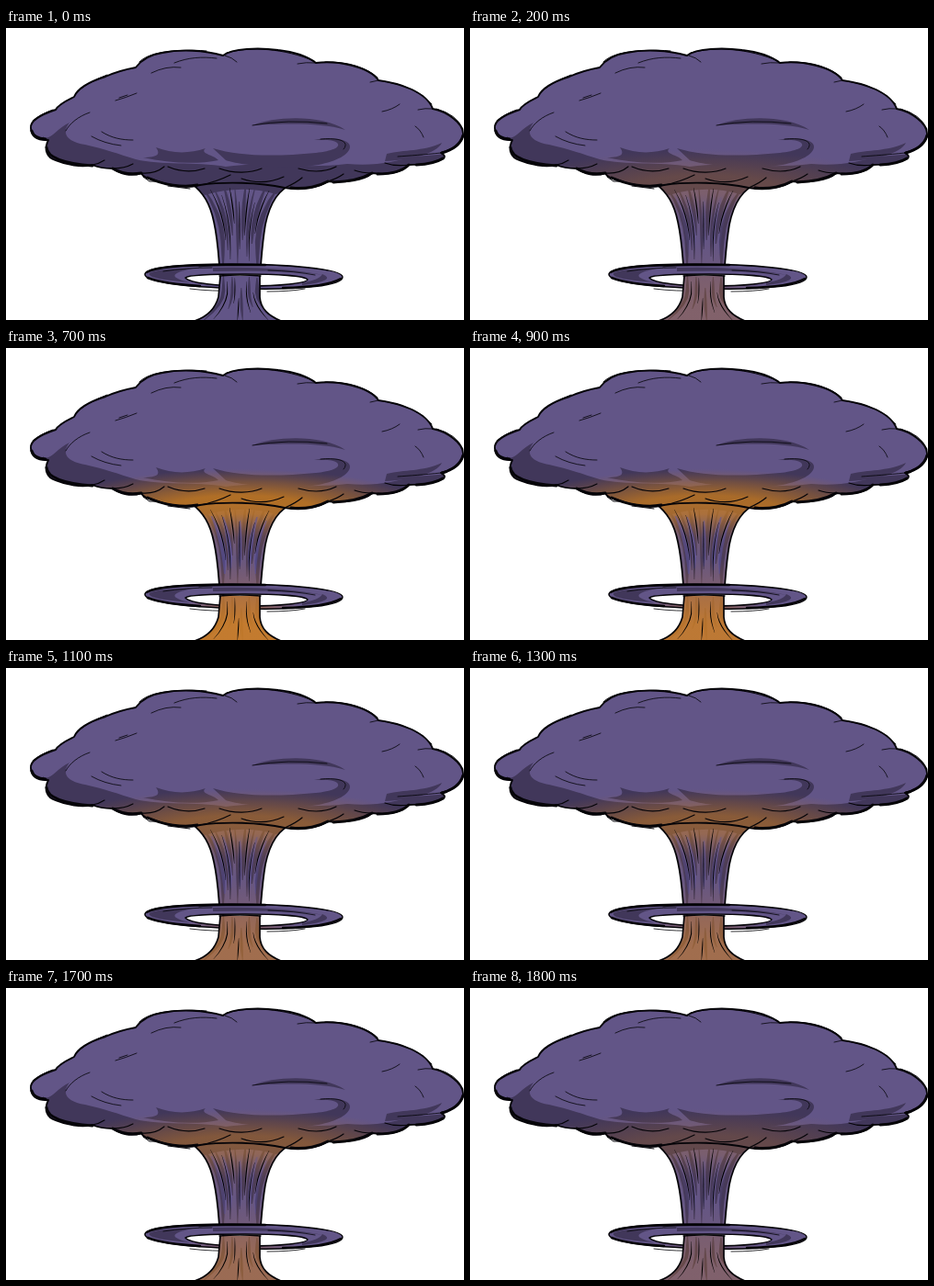
Write an HTML page that moves like this. It is 498 px wide and 318 px high and loops after 1900 ms.

```html
<!DOCTYPE html>
<html lang="en">
<head>
<meta charset="utf-8">
<title>Mushroom cloud</title>
<style>
html, body { margin: 0; width: 100%; height: 100%; overflow: hidden; background: #fff; }
svg { display: block; width: 498px; height: 318px; }
.body { fill: #625587; }
.shade { fill: #41375a; }
.ink { fill: none; stroke: #050408; stroke-linecap: round; stroke-linejoin: round; }
</style>
</head>
<body>
<svg viewBox="0 0 498 318">
  <defs>
    <path id="cap" d="M27 109C26 101 36 95 54 89C57 83 66 79 74 75C78 65 92 58 108 53C119 48 130 45 141 43C147 35 156 29 170 27C190 23 215 24 236 30C246 22 275 21 296 24C314 26 328 31 337 38C360 35 395 42 405 57C427 60 457 69 464 88C480 91 497 104 497 115C497 125 487 132 473 136C480 140 477 143 468 145C459 149 447 149 438 149C432 157 416 160 398 158C390 166 366 169 350 167C340 174 322 177 303 174C275 168 238 167 211 171C196 175 174 171 160 165C153 164 149 162 147 158C136 162 124 159 116 153C108 153 100 152 94 149C82 152 66 149 54 144C44 141 41 132 46 122C34 123 27 118 27 109Z"/>
    <path id="stem" d="M201 169Q256 158 312 170C294 176 286 195 282 214C279 232 278 247 277 264H232C231 246 230 229 226 211C222 192 215 179 201 169Z"/>
    <path id="base" d="M233 270H276V293C277 306 285 313 299 319H205C220 314 228 304 231 293Z"/>
    <path id="ring" fill-rule="evenodd" d="M151 268C153 260 195 257 245 257C305 257 365 262 366 271C366 281 319 285 266 284C204 283 150 277 151 268ZM195 272C200 278 230 281 263 281C298 281 326 278 328 274C325 270 295 268 260 268C225 268 198 269 195 272Z"/>
    <clipPath id="capClip"><use href="#cap"/></clipPath>
    <clipPath id="stemClip"><use href="#stem"/></clipPath>
    <clipPath id="baseClip"><use href="#base"/></clipPath>
    <radialGradient id="heat" gradientUnits="userSpaceOnUse" cx="0" cy="0" r="1" gradientTransform="translate(255 181) scale(215 49)">
      <stop offset="0" stop-color="#bf761f"/>
      <stop offset=".42" stop-color="#bf761f"/>
      <stop offset=".72" stop-color="#b8721f" stop-opacity=".5"/>
      <stop offset="1" stop-color="#a86828" stop-opacity="0"/>
    </radialGradient>
    <linearGradient id="stemHeat" gradientUnits="userSpaceOnUse" x1="0" y1="165" x2="0" y2="264">
      <stop offset="0" stop-color="#c47a22"/>
      <stop offset=".16" stop-color="#c47a22" stop-opacity=".9"/>
      <stop offset=".42" stop-color="#a0683c" stop-opacity=".3"/>
      <stop offset=".65" stop-color="#a0683c" stop-opacity=".12"/>
      <stop offset="1" stop-color="#b07048" stop-opacity=".45"/>
    </linearGradient>
    <linearGradient id="baseHeat" gradientUnits="userSpaceOnUse" x1="0" y1="268" x2="0" y2="300">
      <stop offset="0" stop-color="#c67a2a" stop-opacity=".85"/>
      <stop offset="1" stop-color="#d08023"/>
    </linearGradient>
    <radialGradient id="ringHeat" gradientUnits="userSpaceOnUse" cx="0" cy="0" r="1" gradientTransform="translate(255 286) scale(70 17)">
      <stop offset="0" stop-color="#c87a28" stop-opacity=".8"/>
      <stop offset="1" stop-color="#c87a28" stop-opacity="0"/>
    </radialGradient>
  </defs>

  <g clip-path="url(#stemClip)">
    <use href="#stem" class="body"/>
    <path class="shade" d="M200 166H313L294 181Q256 170 216 182Z"/>
    <g id="stemShade" class="shade"></g>
    <rect class="glow" x="195" y="160" width="120" height="106" fill="url(#stemHeat)"/>
    <g id="cool" class="glow" fill="#5751a4"></g>
    <g id="stemInk"></g>
  </g>
  <path class="ink" stroke-width="1.8" d="M201 169C215 179 222 192 226 211C230 229 231 246 232 259M312 170C294 176 286 195 282 214C279 232 278 247 277 259"/>

  <use href="#cap" class="body"/>
  <g clip-path="url(#capClip)">
    <g class="shade">
      <path d="M40 118C48 124 53 111 69 103C59 116 68 124 86 127C109 132 121 137 141 143C169 150 205 145 239 151C281 145 324 154 371 148C402 151 424 145 444 140L482 137V180H160L40 150Z"/>
      <path d="M163 130C181 137 199 137 217 131C210 137 226 138 231 144C207 149 176 147 149 141C166 141 168 137 163 130Z"/>
      <path d="M225 131C254 140 294 140 337 136C354 134 365 130 360 125C356 121 344 122 335 122C353 118 374 121 374 129C374 138 359 145 340 149C301 155 253 149 239 144Z"/>
      <path d="M268 106C292 96 344 94 369 111C342 103 307 104 268 106Z"/>
      <path d="M414 137C434 132 452 135 474 125C468 137 440 144 412 145Z"/>
    </g>
    <rect class="glow" x="30" y="120" width="450" height="62" fill="url(#heat)"/>
    <path class="ink" stroke-width=".8" d="M91 92C79 96 69 104 65 112M104 113C115 120 126 122 138 122M93 118Q107 126 125 128M119 79Q130 76 142 71M123 76L132 73M183 38C198 32 213 31 229 33M158 49Q174 41 190 43M238 30Q246 32 251 37M337 38Q326 37 317 39M405 57L396 59M409 91Q420 89 428 83M464 88Q456 87 448 89M445 107Q451 111 454 119M473 136C454 138 439 139 426 140M268 106Q306 99 349 104M342 121C364 119 374 124 367 132"/>
    <path class="ink" stroke-width="1.2" d="M94 149Q101 148 107 144M116 153Q129 153 138 148M147 158C158 159 166 156 172 151M176 151C190 157 204 157 216 153M211 171C228 168 238 163 244 160M232 153C248 159 266 158 278 153M256 164C273 170 289 168 302 162M303 174Q315 169 322 163M318 153C335 158 349 156 359 151M350 167Q360 164 367 159M398 158Q387 158 379 155M438 149Q423 151 412 147"/>
  </g>
  <use href="#cap" class="ink" stroke-width="1.9"/>
  <path class="ink" stroke-width="3" d="M28 112Q30 120 43 121M44 130C45 143 70 148 94 150M116 153Q130 161 147 158M154 163C171 171 193 174 208 171M310 174C326 176 341 172 350 167M356 168Q382 167 398 158M404 159Q428 159 438 149M446 149Q466 148 475 142M474 136Q493 131 497 117"/>
  <path class="ink" stroke-width="1" d="M29 101Q39 93 51 89M75 73Q85 60 110 51M145 37C154 27 182 22 218 25M240 27C266 20 303 22 335 36M347 37C373 36 393 44 404 54M411 58Q448 64 463 83M468 88Q490 94 497 110M149 162L156 167L164 167M176 172L200 175"/>

  <use href="#ring" class="body"/>
  <path class="shade" d="M156 267C166 262 190 262 203 262C177 267 178 272 200 277C174 275 153 272 156 267ZM225 261Q294 259 346 269Q306 263 225 265ZM322 277Q340 275 344 268Q361 275 322 280Z"/>
  <use href="#ring" class="glow" fill="url(#ringHeat)"/>
  <use href="#ring" class="ink" stroke-width="1.5"/>
  <path class="ink" stroke-width="2.4" d="M153 266C163 260 201 258 239 258H282M154 272Q173 279 211 281M301 283Q348 282 364 273"/>
  <path class="ink" stroke-width=".8" d="M210 260C248 255 310 258 350 264M171 265Q196 261 224 261M285 264Q315 265 336 269M200 284Q224 287 250 286M284 287Q310 287 325 284"/>

  <g clip-path="url(#baseClip)">
    <use href="#base" class="body"/>
    <g id="baseShade" class="shade"></g>
    <rect class="glow" x="200" y="268" width="102" height="52" fill="url(#baseHeat)"/>
    <g id="baseInk"></g>
  </g>
  <path class="ink" stroke-width="1.7" d="M233 270L231 293C228 304 220 314 205 319M276 270V293C277 306 285 313 299 319"/>
  <path class="ink" stroke-width="1.3" d="M232 270Q254 268 277 270"/>
</svg>
<script>
const el = id => document.getElementById(id);
const glows = [...document.querySelectorAll('.glow')];

// Stem strands are placed by u, their share of the width from left to right.
const flare = y => y < 265
  ? 22 + 29 * Math.pow(Math.max(0, (240 - y) / 70), 2.1)
  : 21.5 + 25 * Math.pow(Math.max(0, (y - 287) / 31), 1.8);
const at = (u, y) => 254.5 + (u * 2 - 1) * flare(y);

function strand(u, top, end, w) {
  const left = [], right = [];
  for (let i = 0; i <= 6; i++) {
    const y = top + (end - top) * i / 6;
    const half = w * Math.sin(Math.PI * (i + 0.6) / 7.2) / 2;
    const x = at(u, y);
    left.push((x - half).toFixed(1) + ' ' + y.toFixed(1));
    right.unshift((x + half).toFixed(1) + ' ' + y.toFixed(1));
  }
  return `<path d="M${left.concat(right).join('L')}Z"/>`;
}
const strands = list => list.map(s => strand(...s)).join('');

el('stemShade').innerHTML = strands([
  [.08, 172, 262, 5], [.2, 174, 242, 4], [.32, 170, 226, 4], [.44, 174, 257, 3],
  [.56, 170, 231, 4], [.67, 173, 249, 3], [.79, 171, 235, 5], [.93, 173, 262, 6]
]);
el('cool').innerHTML = strands([
  [.12, 183, 246, 6], [.27, 184, 240, 5], [.5, 188, 238, 4], [.73, 184, 242, 5], [.88, 188, 246, 4]
]);
el('stemInk').innerHTML = strands([
  [.15, 176, 231, 1.2], [.26, 182, 252, 1], [.38, 174, 213, 1.3], [.49, 189, 241, 1],
  [.61, 175, 226, 1.3], [.72, 190, 254, 1], [.85, 177, 224, 1.3]
]);
el('baseShade').innerHTML = strands([
  [.08, 270, 318, 4], [.3, 271, 306, 3], [.53, 283, 318, 3], [.73, 271, 304, 3], [.93, 272, 318, 5]
]);
el('baseInk').innerHTML = strands([
  [.18, 276, 317, 1.2], [.37, 272, 300, 1], [.47, 294, 318, 1.1], [.66, 276, 310, 1], [.83, 288, 318, 1.2]
]);

// Heat pulse: time and strength, advancing in tenths of a second.
const loop = 1900, step = 100;
const pulse = [[0, 0], [400, .57], [700, .88], [800, .95], [1100, .57],
  [1200, .42], [1300, .57], [1500, 1], [1800, .27], [1900, 0]];

function heatAt(t) {
  const i = pulse.findIndex(p => p[0] > t);
  const [t0, a] = pulse[i - 1], [t1, b] = pulse[i];
  return a + (b - a) * (t - t0) / (t1 - t0);
}

const start = performance.now();
function draw() {
  const t = (performance.now() - start) % loop;
  const heat = heatAt(Math.floor(t / step) * step);
  for (const g of glows) g.setAttribute('opacity', g.id === 'cool' ? heat * .6 : heat);
  requestAnimationFrame(draw);
}
draw();
</script>
</body>
</html>
```
